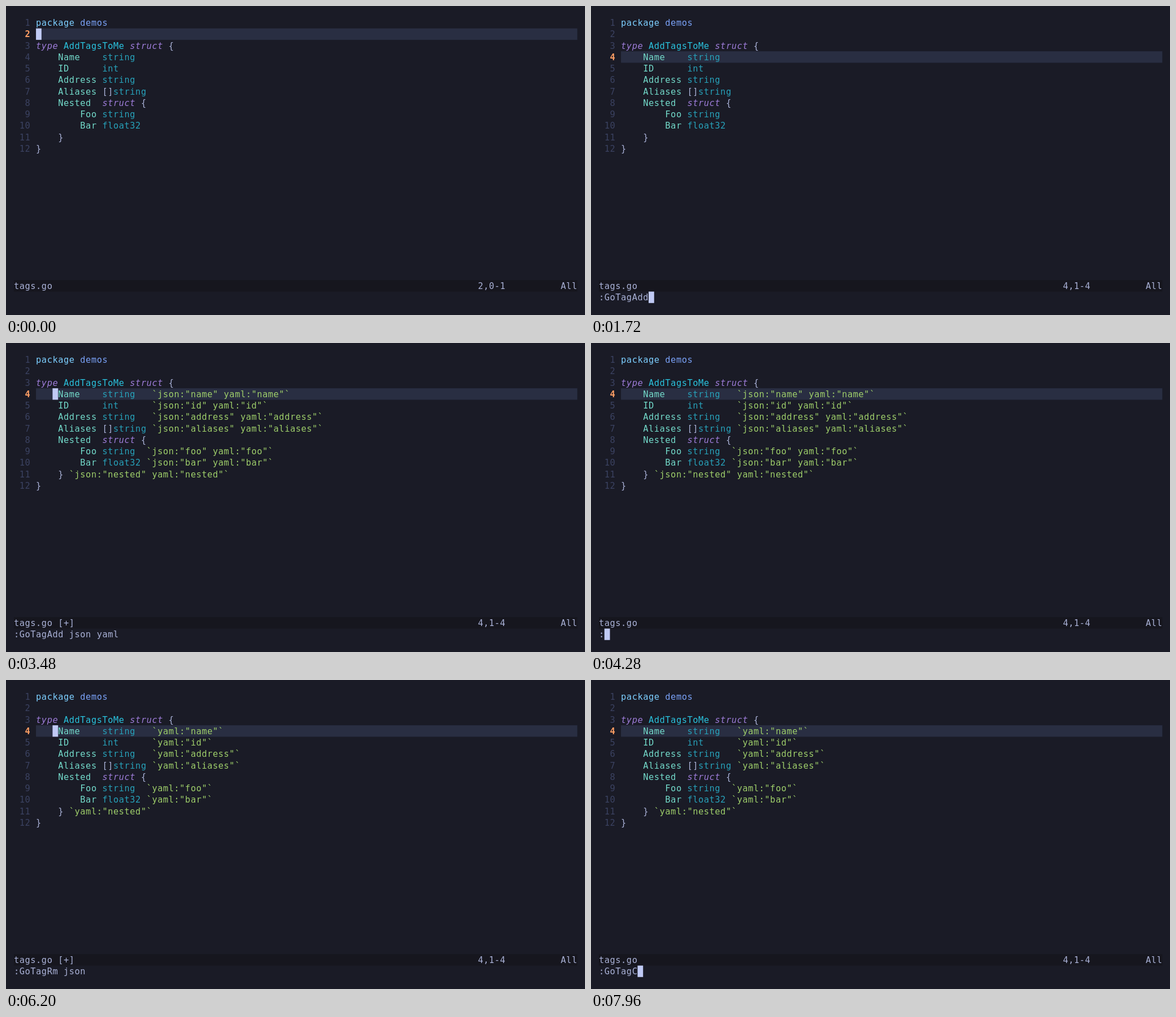
These frames come from a looping animation (1025x547 px, 8 s). An HTML page with a canvas:

```html
<!DOCTYPE html>
<html lang="en">
<head>
<meta charset="utf-8">
<title>Struct tags</title>
<style>
  html, body { margin: 0; width: 100%; height: 100%; overflow: hidden; background: #1a1b26; }
  canvas { display: block; }
</style>
</head>
<body>
<canvas id="screen" width="1025" height="547"></canvas>
<script>
const ctx = document.getElementById('screen').getContext('2d');
const LOOP = 8000, TICK = 40;
const CELL_W = 9.779, CELL_H = 20.256, LEFT = 13.97, TOP = 19.4, COLS = 102;
const STATUS_ROW = 23, CMD_ROW = 24, TEXT_COL = 4;
const FONT = '15.37px "DejaVu Sans Mono", monospace';
const C = {
  bg: '#1a1b26', status: '#16161e', line: '#292e42', cursor: '#c0caf5', fg: '#a9b1d6',
  number: '#3b4261', current: '#ff9e64', pkg: '#7dcfff', module: '#7aa2f7',
  keyword: '#9d7cd8', type: '#2ac3de', builtin: '#27a1b9', field: '#73daca', tag: '#9ece6a'
};

// Each line is a list of [column, text, colour]; a tag is [column, name].
const field = (name, type, tagCol, col = 4) =>
  [[col, name, 'field'], [12, type, 'builtin'], [tagCol, name.toLowerCase()]];
const lines = [
  [[0, 'package', 'pkg'], [8, 'demos', 'module']],
  [],
  [[0, 'type', 'keyword'], [5, 'AddTagsToMe', 'type'], [17, 'struct', 'keyword'], [24, '{', 'fg']],
  field('Name', 'string', 21),
  field('ID', 'int', 21),
  field('Address', 'string', 21),
  [[4, 'Aliases', 'field'], [12, '[]', 'fg'], [14, 'string', 'builtin'], [21, 'aliases']],
  [[4, 'Nested', 'field'], [12, 'struct', 'keyword'], [19, '{', 'fg']],
  field('Foo', 'string', 20, 8),
  field('Bar', 'float32', 20, 8),
  [[4, '}', 'fg'], [6, 'nested']],
  [[0, '}', 'fg']]
];

// Timeline: every entry is a full editor state that holds until the next one.
const states = [{ time: 0, row: 1, cursor: [1, 4], pos: '2,0-1', file: 'tags.go', cmd: '', tags: [] }];
const at = (time, change) => states.push({ ...states[states.length - 1], ...change, time });
const type = (time, text, gaps) => [...text].forEach((_, i) => {
  if (i) time += gaps[i - 1] * TICK;
  at(time, { cmd: text.slice(0, i + 1), cursor: [CMD_ROW, i + 1] });
});
const home = [3, 7], busy = [CMD_ROW, 0];
const edited = { cursor: home, file: 'tags.go [+]' };
const written = size => ({ cursor: home, file: 'tags.go', cmd: `"tags.go" 12L, ${size}B written` });

at(200, { row: 2, cursor: [2, 4], pos: '3,1' });
at(400, { row: 3, cursor: home, pos: '4,1-4' });
type(600, ':GoTagAdd json yaml', '434343343343343343');
at(3480, { ...edited, tags: ['json', 'yaml'] });
type(3560, ':w', '2');
at(3680, written(354));
type(4280, ':GoTagRm json', '433343333333');
at(6160, { cursor: busy });
at(6200, { ...edited, tags: ['yaml'] });
type(6280, ':w', '3');
at(6520, { cursor: busy });
at(6560, written(266));
type(7160, ':GoTagC', '334334');

const x = col => LEFT + col * CELL_W;
const y = row => TOP + row * CELL_H;

function fill(row, col, width, color) {
  ctx.fillStyle = color;
  ctx.fillRect(x(col), y(row), width * CELL_W, CELL_H);
}

function write(row, col, text, color, cursor, style = '') {
  ctx.font = `${style} ${FONT}`;
  [...text].forEach((ch, i) => {
    const covered = cursor[0] === row && cursor[1] === col + i;
    ctx.fillStyle = covered ? C.bg : color;
    ctx.fillText(ch, x(col + i), y(row) + 15.6);
  });
}

function draw(s) {
  ctx.fillStyle = C.bg;
  ctx.fillRect(0, 0, 1025, 547);
  fill(s.row, TEXT_COL, COLS - TEXT_COL, C.line);
  fill(STATUS_ROW, 0, COLS, C.status);
  fill(...s.cursor, 1, C.cursor);

  lines.forEach((parts, row) => {
    const active = row === s.row;
    write(row, 0, String(row + 1).padStart(3), active ? C.current : C.number, s.cursor, active ? 'bold' : '');
    for (const [col, text, kind] of parts) {
      if (kind) write(row, TEXT_COL + col, text, C[kind], s.cursor, kind === 'keyword' ? 'italic' : '');
      else if (s.tags.length) {
        const tag = s.tags.map(key => `${key}:"${text}"`).join(' ');
        write(row, TEXT_COL + col, '`' + tag + '`', C.tag, s.cursor);
      }
    }
  });
  write(STATUS_ROW, 0, s.file, C.fg, s.cursor);
  write(STATUS_ROW, 84, s.pos, C.fg, s.cursor);
  write(STATUS_ROW, 99, 'All', C.fg, s.cursor);
  write(CMD_ROW, 0, s.cmd, C.fg, s.cursor);
}

function frame() {
  const time = performance.now() % LOOP;
  draw(states.findLast(s => s.time <= time));
  requestAnimationFrame(frame);
}
frame();
</script>
</body>
</html>
```
